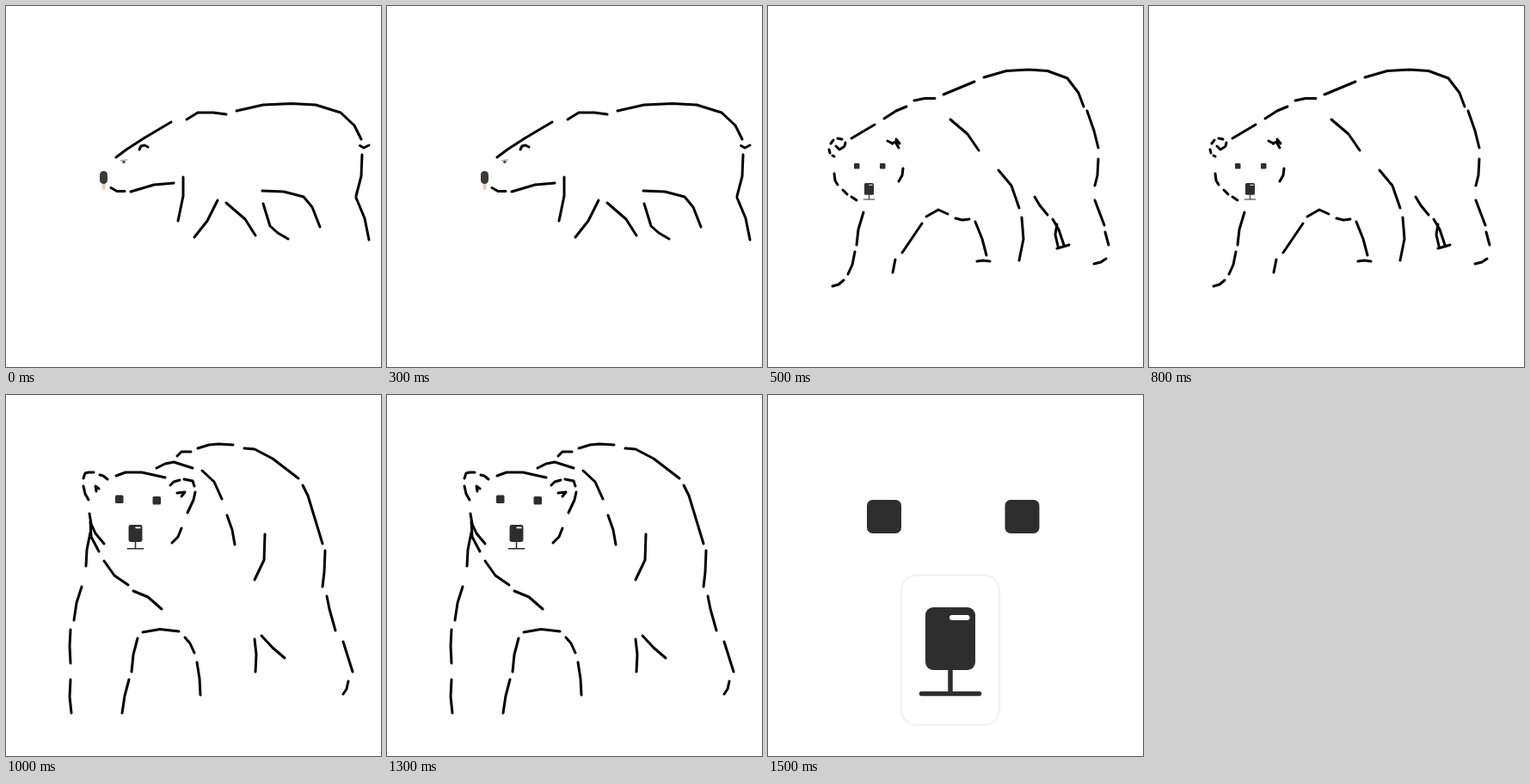
Recreate the animation shown at these times as an HTML page without scripts. Size 436 px wide and 420 px high, loop 2000 ms.

```html
<!DOCTYPE html>
<html lang="en">
<head>
<meta charset="utf-8">
<title>Walking bear</title>
<style>
  html, body { margin: 0; width: 100%; height: 100%; overflow: hidden; background: #fff; }
  svg { display: block; width: 100vw; height: 100vh; }
  .pose { visibility: hidden; animation: show 2s step-end infinite; }
  .front { animation-delay: -1.5s; }
  .near { animation-delay: -1s; }
  .face { animation-delay: -.5s; }
  .ink { fill: none; stroke: #000; stroke-width: 3; stroke-linecap: round; stroke-linejoin: round; }
  .dark { fill: #2e2e2e; }
  @keyframes show {
    0% { visibility: visible; }
    25%, 100% { visibility: hidden; }
  }
</style>
</head>
<body>
<svg viewBox="0 0 436 420">
  <defs>
    <!-- origin: top centre of the nose -->
    <g id="nose">
      <rect class="dark" x="-29" width="58" height="73" rx="9"/>
      <rect x="-1" y="9" width="23.500" height="6" rx="3" fill="#fff"/>
      <path d="M0 72V100M-33.500 100.500H33.500" fill="none" stroke="#2e2e2e" stroke-width="5.500" stroke-linecap="round"/>
    </g>
  </defs>

  <g class="pose side">
    <g class="ink">
      <path d="M128 176L140 167 160 154 192 135M210 132L223 124H241L256 126"/>
      <path d="M268 122L299 115 332 113.500 360 115 389 124 405 139 413 155"/>
      <path d="M411.500 162.500L416 165 422 162M414 173L413 198 407 221M407 223L417 247 422 272"/>
      <path d="M122 211.500L129 215.500H138M145 216L172 208 195 206"/>
      <path d="M206 199V221L200 250M246 226L234 250 219 269M256 229L278 248 290 267"/>
      <path d="M298 215L323 216 346 222 356 234 365 257M299 230L307 256 316 264 328 271"/>
      <path d="M155 167L157 163 161 162 165 164"/>
    </g>
    <path d="M133 180L141 179" stroke="#bbb" stroke-width="2"/>
    <circle cx="137" cy="181.500" r="1.800" fill="#555"/>
    <rect x="111.500" y="204" width="4" height="10" rx="2" fill="#f5c9bc"/>
    <rect x="109" y="192" width="9" height="15" rx="4.500" fill="#3a3a3a"/>
  </g>

  <g class="pose front">
    <g class="ink">
      <path d="M97 154L124 138M135 131L149 122 161 117M170 110L182 107.500H194M204 103L240 88"/>
      <path d="M251 83L277 75.500 303 74 325 75.500 348 84 361 101 367 117M371 122L379 145 384 165M384 178L383 197 380 209"/>
      <path d="M380 226L391 255M392 263L396 278M393 294L387 298 379 300"/>
      <path d="M212 132L232 149 245 168M268 191L283 209 292 235M295 246L297 271 292 296"/>
      <path d="M310 222L316 232 325 243M331 248L338 260 344 278M336 254L334 266 337 279M336 282L350 278"/>
      <path d="M111 240L105 260 103 278M101 286L98 301 93 312M88 319L82 324 75 326"/>
      <path d="M145 310L148 295M156 287L179 253M184 245L198 237 209 242M218 247L226 249 234 248M241 251L249 271 254 290M243 297L250 296 258 297"/>
      <path d="M77 195L78 203 81 208M87 214L92 219M97 222L103 226M157 189L156 197 152 204"/>
      <path d="M73 160L76 156M81 154L86 155M90 159L89 163M71 167L72 171M75 174L77 175M79 163L83 167 88 164"/>
      <path d="M139 157L145 160M149 155L153 160M144 160L148 158 152 165"/>
    </g>
    <g class="dark">
      <rect x="100" y="183" width="6.500" height="6.500" rx="1"/>
      <rect x="130" y="183" width="6.500" height="6.500" rx="1"/>
    </g>
    <use href="#nose" transform="translate(117.500 206) scale(.19)"/>
  </g>

  <g class="pose near">
    <g class="ink">
      <path d="M199 71L204 66 215 66M223 62L236 58 247 57 264 58M277 62L289 63 310 74 340 97"/>
      <path d="M345 105L351 117 368 173M371 181L370 206 368 223M373 234L376 249 383 274M392 287L403 322M398 333L396 342 392 348"/>
      <path d="M175 85L185 80 195 78 217 85M228 88L242 101 251 121M257 140L263 157 266 174"/>
      <path d="M301 162L300 192 289 215M297 280L310 294 324 306M289 284L291 302 290 322"/>
      <path d="M128 94L139 90 158 90 185 96M90 97L92 91 96 90 102 90M109 93L113 94 118 98M90 106L92 115 96 122M104 106L108 109M104 106L105 112"/>
      <path d="M191 105L195 101 202 99M207 98L217 100 219 106M220 113L218 122 211 137M199 114L208 113 204 118M204 155L200 165 193 172"/>
      <path d="M97 138L99 150 104 161 114 173M98 147L99 165 108 182M98 160L94 180 93 199M114 193L126 210 142 221M148 228L165 235 181 249"/>
      <path d="M88 223L82 242 79 262M75 273L74 292 75 312M75 331L74 351 76 370"/>
      <path d="M135 370L138 350 143 331M146 322L148 302 153 283M159 276L179 272.500 201 275M208 282L214 289 219 300M222 311L225 330 226 349"/>
    </g>
    <g class="dark">
      <rect x="127" y="116.500" width="9.500" height="9.500" rx="1.500"/>
      <rect x="170.500" y="118" width="9.500" height="9.500" rx="1.500"/>
    </g>
    <use href="#nose" transform="translate(150.500 151) scale(.275)"/>
  </g>

  <g class="pose face">
    <g class="dark">
      <rect x="115" y="122" width="40" height="39" rx="6.500"/>
      <rect x="275.500" y="122" width="40" height="39" rx="6.500"/>
    </g>
    <rect x="155" y="209.500" width="114" height="174.500" rx="18" fill="#fff" stroke="#f3f3f3" stroke-width="2.500"/>
    <use href="#nose" x="212" y="247"/>
  </g>
</svg>
</body>
</html>
```
